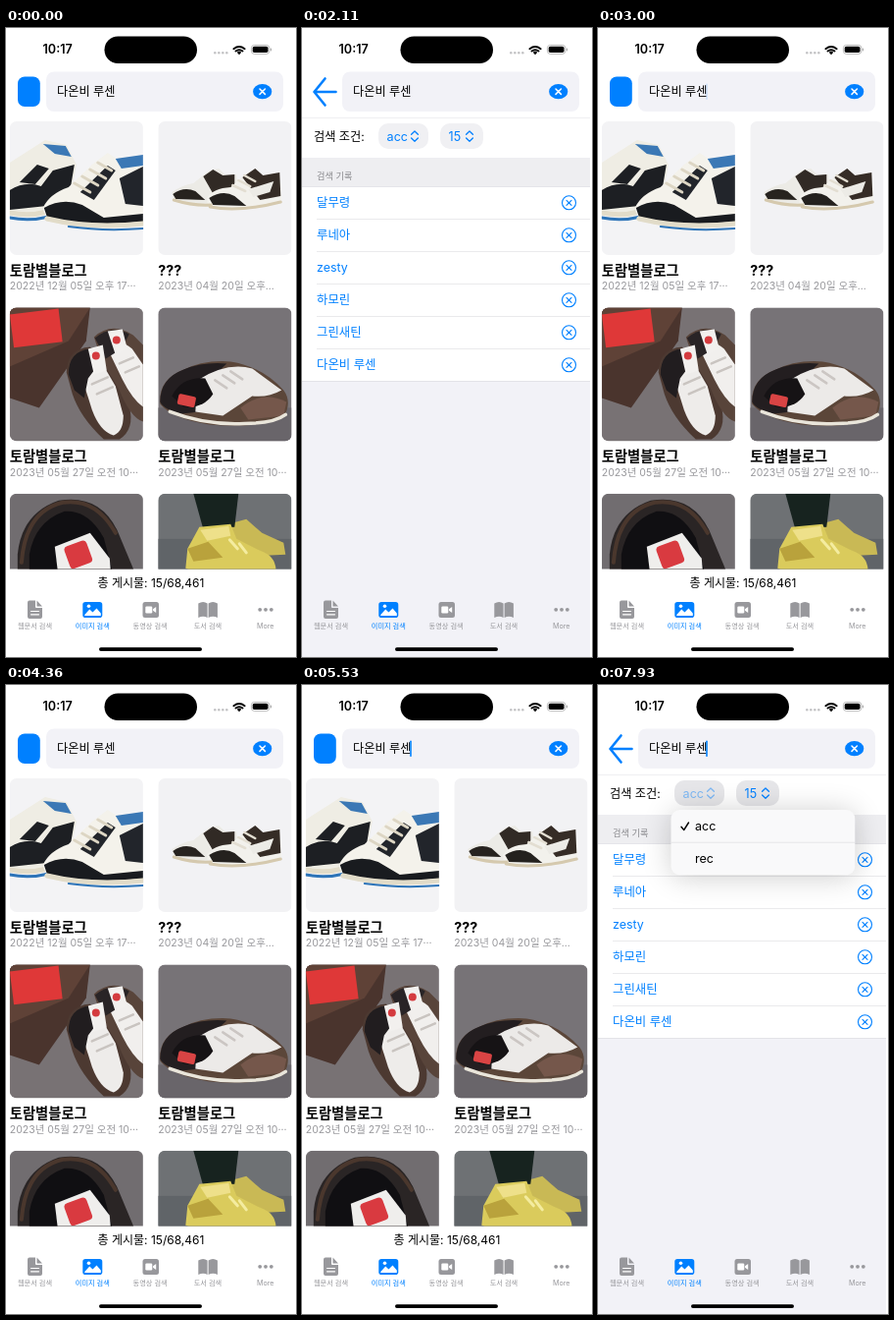
Recreate the animation shown at these times as an HTML page. Size 296 px wide and 640 px high, loop 8000 ms.

```html
<!DOCTYPE html>
<html lang="ko">
<head>
<meta charset="utf-8">
<title>이미지 검색</title>
<style>
html, body { margin: 0; width: 100%; height: 100%; overflow: hidden; background: #fff; }
svg { display: block; width: 100vw; height: 100vh; }
text { font-family: Inter, 'Noto Sans CJK KR', 'Noto Sans CJK', sans-serif; white-space: pre; }
</style>
</head>
<body>
<svg id="stage" viewBox="0 0 296 640" preserveAspectRatio="xMinYMin meet"></svg>
<script>
const LOOP = 8000;
const BLUE = '#0080ff', GRAY = '#98989c', FIELD = '#f2f2f7';
const QUERY = '다온비 루센';
const BLOG = '토람별블로그';
const HISTORY = ['달무령', '루네아', 'zesty', '하모린', '그린새틴', QUERY];

const rect = (x, y, w, h, fill, rx = 0, more = '') =>
  `<rect x="${x}" y="${y}" width="${w}" height="${h}" rx="${rx}" fill="${fill}" ${more}/>`;
const circle = (x, y, r, fill, more = '') =>
  `<circle cx="${x}" cy="${y}" r="${r}" fill="${fill}" ${more}/>`;
const text = (x, y, size, s, fill = '#000', more = '') =>
  `<text x="${x}" y="${y}" font-size="${size}" fill="${fill}" ${more}>${s}</text>`;
const path = (d, fill) => `<path d="${d}" fill="${fill}"/>`;
const line = (d, stroke, w = 1) =>
  `<path d="${d}" fill="none" stroke="${stroke}" stroke-width="${w}" stroke-linecap="round" stroke-linejoin="round"/>`;
const group = (id, s) => `<g id="${id}">${s}</g>`;
const cross = (x, y, r, c, w) =>
  line(`M${x - r} ${y - r}l${2 * r} ${2 * r}m0 ${-2 * r}l${-2 * r} ${2 * r}`, c, w);

// Product pictures, each in a 136 x 136 box
const photos = [
  rect(0, 0, 136, 136, '#f3f3f5') +
  path('M0 42L22 28 36 19 58 24 68 44 62 74 40 92 0 95Z', '#efede4') +
  path('M34 23L57 25 63 36 46 33Z', '#3b78b5') +
  path('M0 70Q16 60 32 66L44 50 66 44 62 68 38 86 0 90Z', '#1d1f23') +
  path('M10 62L28 44 40 48 26 64Z', '#1d1f23') +
  line('M0 93Q20 97 38 92', '#e2dcc9', 5) + line('M0 98Q20 102 40 97', '#2d74b8', 3) +
  path('M34 88Q40 74 60 67L84 44 100 32 112 40 136 37V106Q92 112 52 104 34 99 34 88Z', '#f4f2eb') +
  path('M108 38L136 34V45L114 48Z', '#3b78b5') +
  path('M35 88Q54 77 74 85L96 98 136 94V102Q80 108 38 97Z', '#191b1f') +
  path('M72 72L100 45 108 50 86 80Z', '#22252b') +
  path('M112 58L136 46V86L118 84Z', '#22252b') +
  line('M66 63l16 9M74 56l16 9M82 49l16 9M90 42l14 8', '#ddd6c4', 3) +
  line('M38 99Q84 110 136 104', '#e2dcc9', 5) + line('M60 107Q96 112 136 109', '#2d74b8', 2),

  rect(0, 0, 136, 136, '#f2f2f4') +
  path('M14 72Q24 65 36 63L52 50 62 48 68 54 80 54 84 82 70 87Q36 86 16 80Z', '#ecebe6') +
  path('M15 74Q26 66 38 71L48 80 18 79Z', '#27231f') +
  path('M46 56L56 49 66 55 78 54 78 75 58 77Z', '#312a25') +
  path('M50 78Q56 68 74 67L90 53 100 48 106 55 124 52 126 80Q90 92 58 89 49 86 50 78Z', '#f2f1ec') +
  path('M52 78Q66 69 78 76L90 86 56 85Z', '#24211e') +
  path('M86 57L99 48 107 55 124 52 125 76 104 80Z', '#352c26') +
  path('M92 69L118 61 114 72 97 77Z', '#ecebe6') +
  line('M76 65l13 6M82 60l12 6M88 55l11 6', '#e3ded2', 2.5) +
  line('M16 80Q35 86 54 85M53 87Q82 93 125 82', '#d5c9ae', 3),

  rect(0, 0, 136, 136, '#787274') +
  path('M0 0H82L78 34 30 102 0 92Z', '#4a342d') + path('M0 0H82L60 34 0 60Z', '#5f4237') +
  rect(2, 4, 50, 34, '#df3838', 0, 'transform="rotate(-7 27 21)"') +
  path('M58 66Q58 42 82 40L108 60 122 100Q128 124 112 134H96Q72 112 64 88Z', '#4c3931') +
  path('M72 66Q82 50 94 56L108 80 116 110Q116 126 106 130 92 126 84 104Z', '#eeecea') +
  path('M60 68Q60 44 82 42L92 56 80 72 76 92 66 84Z', '#211d1f') +
  path('M86 30Q104 14 126 28L136 38V116Q123 112 111 82L94 54Z', '#58443a') +
  path('M100 42Q112 30 125 42L136 58V101Q125 93 115 73Z', '#f1efed') +
  path('M87 31Q104 17 122 27L114 42 98 52Z', '#292426') +
  path('M80 42L95 38 99 64 86 68ZM100 24L115 22 120 42 108 48Z', '#f2f0ee') +
  rect(84, 45, 8, 8, '#d43b3f', 4) + rect(105, 29, 8, 8, '#d43b3f', 4) +
  line('M84 78l16-7M89 88l16-7M112 57l14-6M118 66l14-6', '#c9c4c0', 2.5),

  rect(0, 0, 136, 136, '#777377') + rect(0, 102, 136, 34, '#69656a') +
  path('M2 98Q0 74 24 64 46 53 74 55 106 60 128 84 137 96 128 112 96 124 52 119 14 113 2 98Z', '#5b4639') +
  path('M2 96Q2 72 26 63 46 55 70 57L58 68 60 104 24 108Q6 104 2 96Z', '#231e20') +
  path('M40 74Q70 55 96 62L126 84Q112 92 96 90L66 110 38 106Z', '#eceae8') +
  path('M14 90Q24 70 48 72L56 88Q46 103 26 101Z', '#161315') +
  path('M84 102Q106 84 131 96L128 110 92 114Z', '#75574b') +
  rect(20, 89, 18, 11, '#d94444', 2, 'transform="rotate(12 28 95)"') +
  line('M58 74l12 8M66 69l12 8M74 65l12 8', '#cbc6c3', 2.5) +
  line('M12 106Q48 120 88 118 118 118 130 109', '#e9e5da', 3.5),

  rect(0, 0, 136, 136, '#716d70') +
  path('M8 136V62Q12 20 50 7 92 0 110 38L136 100V136Z', '#2a2525') +
  path('M20 136V62Q26 28 56 18 80 16 96 45L120 136Z', '#100f12') +
  line('M12 70Q16 18 54 9 88 4 108 40', '#4a372d', 4) +
  path('M46 54L82 40 102 66 108 136H56Z', '#efeeec') +
  rect(58, 50, 24, 24, '#d93a40', 4, 'transform="rotate(-20 70 62)"'),

  rect(0, 0, 136, 136, '#6e7174') + rect(0, 46, 136, 90, '#606468') +
  path('M68 32L90 26 106 40 128 50 130 62 84 64Z', '#c9b955') +
  path('M36 0H82L78 34 46 36Z', '#17231f') +
  path('M42 34L74 31 80 46 104 58Q122 64 120 82L50 84 28 76 30 56Z', '#dacb5c') +
  path('M43 37L72 33 74 43 50 48Z', '#eee08a') +
  path('M30 56L51 49 66 65 36 69Z', '#b9a23c') +
  line('M73 47l8 9M83 51l7 9', '#f4ec9f', 3)
];

const captions = [
  [BLOG, '2022년 12월 05일 오후 17···'],
  ['???', '2023년 04월 20일 오후...'],
  [BLOG, '2023년 05월 27일 오전 10···'],
  [BLOG, '2023년 05월 27일 오전 10···'],
  ['', ''], ['', '']
];

const cells = draw => captions.map((c, i) => {
  const x = i % 2 ? 155.3 : 3.8, y = 95 + 189.4 * (i >> 1);
  return `<g transform="translate(${x} ${y})">${draw(i, c)}</g>`;
}).join('');

const cards = cells((i, [title, date]) =>
  `<g clip-path="url(#card)">${photos[i]}</g>` +
  text(0, 156.5, 14.3, title, '#000', 'font-weight="700"') +
  text(0, 171.3, 10.5, date, GRAY));

const bones = cells(() =>
  rect(0, 0, 136.4, 136, '#d9d9d9', 7) +
  rect(0, 146.3, 70, 10, '#d9d9d9', 1.5) + rect(0, 163.3, 53.5, 8, '#d9d9d9', 1.5));

const arcs = [[7.5, 19.5], [4.7, 22.5]].map(([r, y]) =>
  line(`M${238 - r * .75} ${y + r * .22}Q238 ${y - r * .35} ${238 + r * .75} ${y + r * .22}`, '#000', 1.9)).join('');

const statusBar =
  text(37.5, 26.2, 12.6, '10:17', '#000', 'font-weight="600"') +
  rect(100.5, 8.5, 94.5, 27.5, '#000', 13.75) +
  [0, 1, 2, 3].map(i => circle(213.3 + 4 * i, 25.3, 1.3, '#c4c4c6')).join('') +
  arcs + path('M235.7 24.7Q238 22.8 240.3 24.7L238 27.3Z', '#000') +
  rect(250.4, 17.4, 18.4, 9, 'none', 3, 'stroke="#aaa" stroke-width=".8"') +
  rect(251.7, 18.7, 15.8, 6.4, '#000', 1.8) + rect(269.8, 20.4, 1.2, 3, '#aaa', .6);

const searchBar =
  rect(41, 44.5, 242, 40.5, FIELD, 8) + text(52, 69.2, 12.2, QUERY) +
  rect(110.2, 56.5, 1.6, 16.5, BLUE, .8, 'id="caret"') +
  `<ellipse cx="261.7" cy="64.7" rx="9.6" ry="7.6" fill="${BLUE}"/>` + cross(261.7, 64.7, 2.7, '#fff', 1.5);

const tabIcons = [
  path('M24 582.5h6v6.5q0 1 1 1h6v9q0 2-2 2h-11q-2 0-2-2v-14.5q0-2 2-2zM31.5 582.5l5.5 6h-5.5z', GRAY) +
    line('M25.5 593.5h8M25.5 596.8h8', '#fff', 1.2),
  rect(78.3, 584, 20, 16, BLUE, 2.8) + path('M80.3 597l5-5.5 3.2 3 4-4 4.3 5v2.5h-16.5z', '#fff') +
    circle(84.5, 588.3, 1.8, '#fff'),
  rect(139.5, 584, 16.5, 16, GRAY, 2.5) + rect(142.3, 588.5, 7, 7, '#fff', 1.2) +
    path('M150 591.3l3.2-2.3v6l-3.2-2.3z', '#fff'),
  path('M196.3 585.5q5-3 9.3 0v14.5q-4.3-2.6-9.3 0zM206.6 585.5q4.5-3 9.3 0v14.5q-4.8-2.6-9.3 0z', GRAY),
  [259.2, 265, 270.8].map(x => circle(x, 591.8, 1.9, GRAY)).join('')
];
const tabs = ['웹문서 검색', '이미지 검색', '동영상 검색', '도서 검색', 'More'].map((s, i) =>
  tabIcons[i] + text(29.5 + 58.8 * i, 611.2, 7.2, s, i == 1 ? BLUE : GRAY,
    `text-anchor="middle" font-weight="${i == 1 ? 500 : 400}"`)).join('');

const results =
  rect(12, 49.5, 22.8, 30.5, BLUE, 7) +
  `<g clip-path="url(#grid)">${group('cards', cards) + group('bones', bones)}</g>` +
  text(148, 568.5, 12, '총 게시물: 15/68,461', '#000', 'text-anchor="middle"');

const pill = (id, x, w, s) =>
  rect(x, 97, w, 26, '#f0f0f3', 10, `id="${id}Bg"`) + group(id,
    text(x + 8.6, 114.8, 12.6, s, BLUE) +
    line(`M${x + w - 17.4} 108.2l3.4-3.2 3.4 3.2m0 3.8l-3.4 3.2-3.4-3.2`, BLUE, 1.3));

const rows = HISTORY.map((s, i) => {
  const y = 161.5 + 33 * i;
  return text(15, y + 20.8, 12.4, s, BLUE) +
    circle(272.5, y + 16.3, 7, 'none', `stroke="${BLUE}" stroke-width="1.1"`) +
    cross(272.5, y + 16.3, 2.5, BLUE, 1.1) +
    (i < 5 ? rect(15, y + 32.6, 279, .6, '#dcdcdf') : '');
}).join('');

const search =
  line('M34.5 65H12.5M23.5 51.5L12.5 65 23.5 78.5', BLUE, 2.6) +
  rect(0, 91, 294, .7, '#e9e9ec') + text(12, 114.5, 12.2, '검색 조건:') +
  pill('acc', 78, 51, 'acc') + pill('count', 141, 44, '15') +
  rect(0, 132, 294, 508, FIELD) + rect(0, 132, 294, 29.5, '#eeeef1') +
  text(15, 153.7, 9.2, '검색 기록', '#8a8a8e') +
  rect(0, 161.2, 294, 198, '#fff') + rect(0, 161, 294, .6, '#d8d8dc') + rect(0, 359, 294, .6, '#d8d8dc') + rows;

const menu =
  rect(75, 129, 187, 66, '#000', 9, 'opacity=".2" filter="url(#soft)"') +
  rect(74.5, 127, 187.8, 66.3, '#f9f9fa', 9) + rect(74.5, 159.8, 187.8, .7, '#dedee1') +
  line('M85 144.3l2.7 3.2 4.8-7.5', '#000', 1.4) +
  text(99, 147.8, 12.6, 'acc') + text(99, 180.8, 12.6, 'rec');

const stage = document.getElementById('stage');
stage.innerHTML =
  `<defs><clipPath id="card">${rect(0, 0, 136.4, 136, '#000', 7)}</clipPath>` +
  `<clipPath id="grid">${rect(0, 90, 296, 460.5, '#000')}</clipPath>` +
  '<filter id="soft" x="-50%" y="-100%" width="200%" height="300%"><feGaussianBlur stdDeviation="15"/></filter></defs>' +
  rect(0, 0, 296, 640, '#fff') + group('results', results) + group('search', search) +
  statusBar + searchBar + tabs + rect(95, 630.2, 105, 3.8, '#000', 1.9) + group('menu', menu);

const $ = id => document.getElementById(id);
const show = (id, on) => $(id).setAttribute('display', on ? 'inline' : 'none');
const alpha = (id, v) => $(id).setAttribute('opacity', v);
const clamp = v => Math.max(0, Math.min(1, v));

// Caret opacity from each time on
const caretSteps = [
  [0, 0], [1300, 1], [2000, .5], [2110, 0], [2320, .5], [2430, .3], [3000, .15], [3100, 0],
  [3340, .5], [3460, 1], [4000, .5], [4110, 0], [4460, 1], [4980, .5], [5090, 0], [5340, .5], [5450, 1],
  [6380, .5], [6580, 0], [6700, .5], [6840, 1], [7380, .5], [7490, 0], [7720, .5], [7830, 1]
];

function update(t) {
  const searching = (t >= 1300 && t < 2430) || t >= 5740;
  const loading = t >= 2430 && t < 3000;
  show('search', searching);
  show('results', !searching);
  show('bones', loading);
  show('cards', !loading);
  alpha('caret', caretSteps.filter(s => s[0] <= t).pop()[1]);

  const p = clamp((t - 7140) / 460), open = 1 - (1 - p) ** 3;
  const scale = .2 + .8 * open;
  show('menu', p > 0);
  alpha('menu', clamp(open * 1.4));
  $('menu').setAttribute('transform', `translate(103 125) scale(${scale}) translate(-103 -125)`);
  alpha('acc', 1 - .55 * open);
  const shade = Math.round(240 - 10 * open);
  for (const id of ['accBg', 'countBg']) $(id).setAttribute('fill', `rgb(${shade},${shade},${shade + 3})`);
}

function frame() {
  update(performance.now() % LOOP);
  requestAnimationFrame(frame);
}
frame();
</script>
</body>
</html>
```
